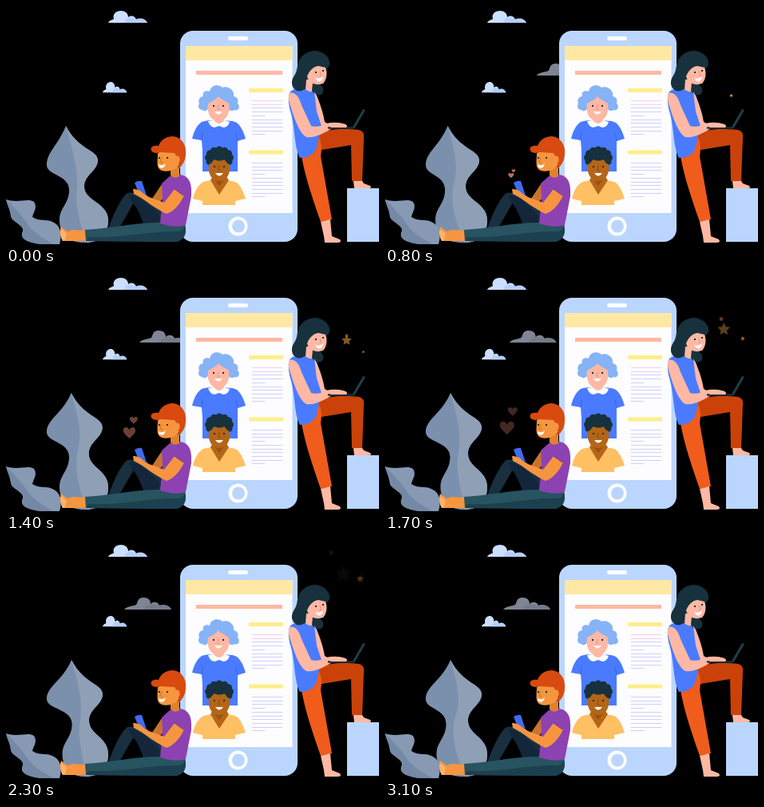
Animation, 467 px wide and 299 px high, one loop 3200 ms. Source, as an HTML page:

```html
<!DOCTYPE html>
<html lang="en">
<head>
<meta charset="utf-8">
<title>People sharing online</title>
<style>
  html, body { margin: 0; width: 100%; height: 100%; overflow: hidden; background: #000; }
  svg { display: block; width: 100%; height: 100%; }
  .sky { fill: #bbd6fe; }
  .navy { fill: #17313d; }
  .blue { fill: #4a7bff; }
  .peach { fill: #ffb8a4; }
  .tan { fill: #f6953f; }
  .brown { fill: #b46518; }
  .white { fill: #fdfdff; }
  .line { fill: none; stroke-linecap: round; stroke-linejoin: round; }
</style>
</head>
<body>
<svg viewBox="0 0 467 299" preserveAspectRatio="none">
  <defs>
    <g id="cloud">
      <path fill="#cbdfff" d="M0 15C2 11 5 12 7 10C5 4 10 0 16 0C21 0 25 3 25 8C29 5 34 7 35 11C41 9 47 11 49 15Z"/>
      <path fill="#b5cefb" d="M20 15C21 8 30 6 34 11C40 8 47 10 49 15Z"/>
    </g>
    <path id="heart" d="M0 .9C-.4 .5 -1 .1 -1 -.4C-1 -1 -.3 -1.1 0 -.5C.3 -1.1 1 -1 1 -.4C1 .1 .4 .5 0 .9Z"/>
    <path id="star"/>
  </defs>

  <use href="#cloud" x="128" y="6"/>
  <use href="#cloud" transform="translate(121 95) scale(.62 .88)"/>
  <g id="drift" fill="#7f8593">
    <path d="M0 15C3 11 10 11 15 9C17 7 16 0 24 0C31 0 33 4 33 8C37 4 43 6 44 10C51 8 57 10 59 15Z"/>
    <path fill="#747b89" d="M24 15C27 9 36 6 42 10C49 8 57 10 59 15Z"/>
  </g>

  <!-- plants -->
  <path id="leaf" fill="#7b90ac"/>
  <path id="leafShade" fill="#8f9fb6"/>
  <path fill="#8799b3" d="M0 242C14 247 28 240 35 245C40 252 34 258 33 264C42 270 50 266 58 270C70 275 70 288 67 298L44 298C20 295 18 288 21 282C24 274 6 270 6 262C5 254 2 250 0 242Z"/>
  <path fill="#7489a5" d="M0 242C12 254 20 262 27 273C36 286 47 290 59 298L44 298C20 295 18 288 21 282C24 274 6 270 6 262C5 254 2 250 0 242Z"/>

  <!-- phone -->
  <rect class="sky" x="218" y="31" width="147" height="264" rx="16"/>
  <rect class="white" x="225" y="50" width="133.500" height="209"/>
  <rect fill="#ffe8a4" x="225" y="50" width="133.500" height="18"/>
  <rect class="white" x="278" y="38" width="25" height="5" rx="2.500"/>
  <circle class="white" cx="290.500" cy="275.500" r="12"/>
  <circle class="sky" cx="291" cy="275.500" r="8"/>
  <rect fill="#ffb9a2" x="238" y="81" width="108" height="5"/>
  <path fill="#ffee8c" d="M304 103h43v5h-43zM304 180.500h43v5h-43z"/>
  <g id="rows" class="line"></g>

  <!-- upper portrait -->
  <path class="blue" d="M245 145C251 143 256 143 266 144C277 143 284 143 289 146C295 151 298 159 300 166L290 169V207H246V181L245 168L233 166C235 157 239 149 245 145Z"/>
  <path class="line" stroke="#315ae0" stroke-width=".7" d="M245 168L246 158M290 169L288 159"/>
  <path fill="#86b3f6" d="M255 107C256 99 266 97 271 102C278 99 287 106 285 113C291 114 291 119 290 122C294 126 291 132 286 130C282 133 278 130 278 126L254 126C253 131 248 133 246 130C241 130 240 125 242 122C240 117 243 113 247 113C245 108 250 105 255 107Z"/>
  <path class="peach" d="M260 138H273V146Q267 151 260 146Z"/>
  <path class="peach" d="M253 122C259 119 264 116 266 113C270 118 276 119 279 122C281 135 275 144 266 144C257 144 251 135 253 122Z"/>
  <path class="white" d="M253 144L260 143Q267 151 273 143L280 145Q278 152 272 152L267 150L261 152Q255 151 253 144Z"/>
  <path class="line" stroke="#ef8f7f" d="M266 124L265 129L267 130"/>
  <path class="white" d="M261 132H271Q266 139 261 132Z"/>
  <path class="navy" d="M259 124h2v2h-2zM271 124h2v2h-2z"/>

  <!-- lower portrait -->
  <path fill="#ffc064" d="M247 220C253 218 260 218 267 219C276 218 284 218 289 221C295 226 298 235 300 241L287 244V249H246V244L234 241C236 232 240 224 247 220Z"/>
  <path class="brown" d="M256 218L260 211H274L279 218L267 236Z"/>
  <path fill="#99520f" d="M260 216Q267 222 274 216L267 225Z"/>
  <g id="curls" class="navy"></g>
  <path class="brown" d="M254 198C258 197 258 194 261 192C265 194 270 194 273 192C276 194 276 197 280 198C282 211 275 219 267 219C259 219 252 211 254 198Z"/>
  <path class="white" d="M262 209H272Q267 216 262 209Z"/>
  <path class="navy" d="M260 200h2v2h-2zM272 200h2v2h-2z"/>
  <path class="line" stroke="#86460f" d="M267 200L266 205L268 206"/>

  <!-- seated reader -->
  <path fill="#c87430" d="M195 223L181 244L189 249L201 236Z"/>
  <path fill="#18303f" d="M192 272C181 260 170 249 160 246L141 279L128 279C134 261 144 240 152 234C161 231 177 239 198 254L202 272Z"/>
  <path fill="#13263a" d="M154 236C166 238 181 248 193 264L190 272H172C167 259 163 250 158 246Z"/>
  <path class="tan" d="M100 281L84 280L77 282L69 276C67 281 68 288 71 294H100Z"/>
  <path fill="#ffb269" d="M70 279L76 285L74 293L71 294C68 288 67 281 70 279Z"/>
  <path fill="#285360" d="M99 280C125 279 160 271 192 271L223 270C227 280 225 291 214 295L100 294Z"/>
  <path fill="#1d4050" d="M103 289C145 291 177 281 217 282C221 281 224 278 224 274C227 284 224 293 213 295L100 294Z"/>
  <path fill="#8d42b2" d="M205 213L218 211C230 213 233 222 232 238L225 274C216 277 204 276 193 272L196 239L195 222Z"/>
  <path fill="#df812f" d="M206 203L217 201V213Q211 217 206 212Z"/>
  <path class="tan" d="M190 184C190 193 188 200 192 204C197 209 211 207 217 199V182L200 179Z"/>
  <path fill="#d84a10" d="M182 181C180 176 185 174 191 175C194 167 201 163 209 163C220 164 226 174 225 184C225 192 222 198 217 203L215 191L211 184C202 184 194 182 189 184C186 184 183 183 182 181Z"/>
  <ellipse class="tan" cx="214.500" cy="192" rx="3" ry="4.500"/>
  <path class="white" d="M191 198Q196 201 200 197Q198 205 192 202Z"/>
  <path class="navy" d="M191 189h2v2h-2zM201 189h2v2h-2z"/>
  <path class="line" stroke="#cf701e" d="M195 190L193 195L196 196"/>
  <path class="tan" d="M211 229L223 237C219 246 211 257 201 260C190 255 176 245 168 239L160 235L159 229L166 230L179 239L198 246Z"/>
  <path class="line" stroke="#6d2f95" d="M211 229L222 237"/>
  <path fill="#416bf0" d="M161 221Q166 218 170 219L176 237L168 239Z"/>
  <path class="tan" d="M160 229L168 231L176 238L169 240L161 235Z"/>

  <!-- laptop worker -->
  <rect class="sky" x="427" y="228" width="40" height="67"/>
  <path fill="#ca4209" d="M381 164C395 153 424 153 442 155Q449 157 448 164L446 219H433L432 174L389 181Z"/>
  <path class="peach" d="M435 219H446L448 222L456 225Q459 228 454 228H436Z"/>
  <path fill="#ef5c1c" d="M366 187L390 163Q397 169 394 188L408 267L394 270C385 244 375 216 370 188Z"/>
  <path class="peach" d="M394 270L406 267L408 288L418 292Q421 296 415 296H399L398 288Z"/>
  <path class="blue" d="M356 107C364 101 374 105 386 104C392 115 396 136 395 151L388 180Q382 190 368 190C360 175 363 153 355 128Q352 113 356 107Z"/>
  <path class="navy" d="M386 56C396 56 405 63 405 71C406 76 401 79 398 80L380 95C378 103 371 108 364 106C357 102 356 94 361 87C365 81 364 76 366 71C369 62 376 57 386 56Z"/>
  <path class="peach" d="M376 92H387V105Q380 110 375 104Z"/>
  <path class="navy" d="M384 96C392 95 399 101 397 108C394 114 386 112 383 106Z"/>
  <path class="peach" d="M377 88C380 80 385 76 391 75L400 77C403 84 401 93 397 97C389 100 379 97 377 88Z"/>
  <path class="white" d="M387 90Q393 92 397 88Q396 96 390 94Z"/>
  <path class="navy" d="M387 82h2v2h-2zM396 80h2v2h-2z"/>
  <path class="line" stroke="#ed8f7f" d="M393 82L395 87L393 88"/>
  <path class="peach" d="M386 107C393 120 397 133 399 145L406 149L396 153L389 132Z"/>
  <path class="peach" d="M355 109C361 107 367 113 370 124L382 150C391 153 400 147 409 146L425 148Q429 151 425 153L410 152C399 159 385 166 376 164C368 160 361 141 357 128Q352 115 355 109Z"/>
  <path class="line" stroke="#17313d" stroke-width="2.400" d="M404 152.500H435"/>
  <path class="line" stroke="#203e4b" stroke-width="3" d="M436 151L448 130.500"/>
  <path class="peach" d="M401 147Q414 144 425 148Q429 151 425 152H407Z"/>

  <g id="sparks"></g>
</svg>

<script>
const LOOP = 3200, STEP = 100;
const NS = "http://www.w3.org/2000/svg";
const byId = id => document.getElementById(id);
const clamp = v => Math.min(1, Math.max(0, v));
const mix = (a, b, k) => a + (b - a) * k;
const smooth = k => k * k * (3 - 2 * k);

function add(parent, tag, attrs) {
  const node = document.createElementNS(NS, tag);
  for (const key in attrs) node.setAttribute(key, attrs[key]);
  return parent.appendChild(node);
}

function drawRows(top, shortRow, firstColor) {
  for (let i = 0; i < 10; i++) {
    const y = Math.round(top + i * 4.7) + .5;
    const end = i === 9 || i === shortRow ? 324 : 346;
    add(byId("rows"), "path", { d: `M308 ${y}H${end}`, stroke: i < 2 ? firstColor : "#cfd0fa" });
  }
}
drawRows(118, 4, "#f2cfee");
drawRows(196, 3, "#cfd0fa");

// Curly hair: a ring of overlapping circles around a filled crown.
add(byId("curls"), "ellipse", { cx: 267, cy: 189, rx: 15, ry: 11 });
for (let i = 0; i < 9; i++) {
  const a = Math.PI * (.85 + i * 1.3 / 8);
  add(byId("curls"), "circle", { cx: 267 + 13.5 * Math.cos(a), cy: 190 + 10 * Math.sin(a), r: 4.5 });
}

const starPoints = Array.from({ length: 10 }, (_, i) => {
  const a = i * Math.PI / 5 - Math.PI / 2, r = i % 2 ? .48 : 1;
  return `${Math.cos(a) * r} ${Math.sin(a) * r}`;
});
byId("star").setAttribute("d", `M${starPoints.join("L")}Z`);

// Each spark rises from one point to another, growing and fading; bow bends its path.
const sparks = [
  { shape: "heart", fill: "#f09078", born: 400, life: 1800, from: [160, 220], to: [150, 184], size: 10, bow: 0 },
  { shape: "heart", fill: "#f09078", born: 400, life: 1800, from: [162, 221], to: [160, 155], size: 6.5, bow: -1 },
  { shape: "star", fill: "#f5ad48", born: 500, life: 1900, from: [438, 126], to: [422, 38], size: 10, bow: -4 },
  { shape: "star", fill: "#f08a48", born: 700, life: 1800, from: [436, 127], to: [402, 2], size: 4.5, bow: 4 },
  { shape: "star", fill: "#f29a3c", born: 1000, life: 1900, from: [445, 121], to: [433, 15], size: 5.5, bow: 8 }
];
for (const s of sparks) s.node = add(byId("sparks"), "use", { href: "#" + s.shape, fill: s.fill });

function drawSpark({ node, born, life, from, to, size, bow }, t) {
  const p = clamp((t - born) / life);
  const x = mix(from[0], to[0], p) + bow * Math.sin(Math.PI * p);
  const y = mix(from[1], to[1], p);
  node.setAttribute("transform", `translate(${x} ${y}) scale(${size * Math.sin(p * Math.PI / 2)})`);
  node.setAttribute("opacity", 1 - p);
}

function drawLeaf(t) {
  const lean = smooth(clamp(t / 1600));
  const tip = mix(75, 82, lean), right = mix(115, 121, lean);
  const base = 67 - 4 * Math.sin(2 * Math.PI * t / 2800);
  const waist = base + 12, neck = right - 17;
  const rightSide = `C128 246 ${neck} 244 ${neck} 226C${neck} 211 ${right} 206 ${right} 193C${right} 180 ${tip + 15} 180 ${tip} 150`;
  byId("leaf").setAttribute("d",
    `M${tip} 150C${tip - 11} 176 51 183 51 199C51 212 ${waist} 211 ${waist} 230C${waist} 248 ${base} 252 ${base} 268C${base} 286 ${base + 12} 296 98 296C118 296 128 286 128 268${rightSide}Z`);
  byId("leafShade").setAttribute("d",
    `M${tip} 150C${tip + 8} 180 ${tip + 15} 200 ${waist + 10} 226C${waist + 6} 252 ${base + 28} 274 99 296C118 296 128 286 128 268${rightSide}Z`);
}

function draw(elapsed) {
  const t = Math.floor(elapsed % LOOP / STEP) * STEP;
  byId("drift").setAttribute("transform", `translate(${mix(220, 148, clamp(t / 1900))} 72)`);
  drawLeaf(t);
  for (const spark of sparks) drawSpark(spark, t);
}

let start;
function tick(now) {
  start ??= now;
  draw(now - start);
  requestAnimationFrame(tick);
}
draw(0);
requestAnimationFrame(tick);
</script>
</body>
</html>
```
